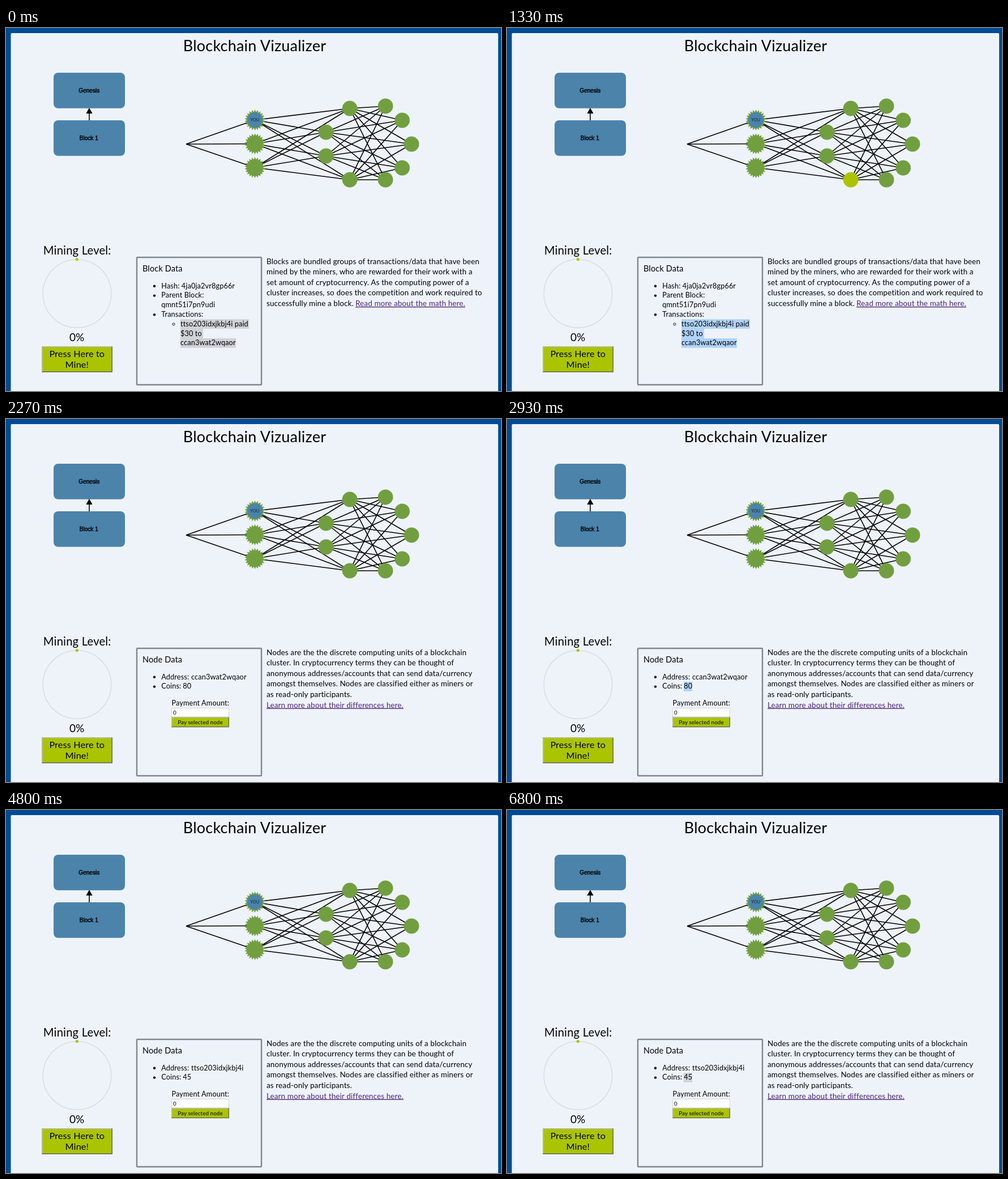
Recreate the animation shown at these times as an HTML page. Size 874x641 px, loop 6.87 s.

```html
<!DOCTYPE html>
<html lang="en">
<head>
<meta charset="utf-8">
<title>Blockchain Vizualizer</title>
<style>
  html, body { margin: 0; width: 100%; height: 100%; overflow: hidden; background: #004b93; }
  svg { display: block; width: 874px; height: 641px; }
  text { font: 12.7px Lato, "Open Sans", sans-serif; letter-spacing: .01em; white-space: pre; }
  .mid { text-anchor: middle; }
  text.title { font-size: 26.88px; }
  text.level { font-size: 20.2px; }
  text.percent { font-size: 19px; }
  text.press { font-size: 16.2px; }
  text.head { font-size: 14.5px; }
  text.body { font-size: 13.44px; }
  text.link { fill: #4f2477; text-decoration: underline; }
  text.small { font-size: 9.8px; }
  text.you { font-size: 7.4px; fill: #17232c; }
  text.block { font: 10.08px "Liberation Sans", Arial, sans-serif; letter-spacing: 0; stroke: #000; stroke-width: .45px; }
  .wire { stroke: #000; stroke-width: 1.6; }
  .node { fill: #719f3f; }
  .blue { fill: #4b83ab; }
  .lime { fill: #abc400; }
  .ring { fill: none; stroke: #dadddf; stroke-width: 1.5; }
</style>
</head>
<body>
<svg viewBox="0 0 874 641">
  <rect x="8.5" y="9" width="860.5" height="640" rx="2" fill="#eef3fa"/>
  <text class="title mid" x="439" y="40.5">Blockchain Vizualizer</text>

  <rect class="blue" x="84" y="79" width="126" height="62.8" rx="8"/>
  <rect class="blue" x="84" y="163" width="126" height="62.8" rx="8"/>
  <text class="block mid" x="146.8" y="114.4">Genesis</text>
  <text class="block mid" x="146.3" y="198.4">Block 1</text>
  <path class="wire" d="M147 163V150"/>
  <path d="M147 141l5.6 10h-11.2z"/>

  <g id="net"></g>
  <text class="you mid" x="439.3" y="165.2">YOU</text>

  <text class="level mid" x="125.7" y="399.8">Mining Level:</text>
  <circle class="ring" cx="125.5" cy="469" r="60.3"/>
  <circle class="lime" cx="125.3" cy="408.6" r="2.6"/>
  <text class="percent mid" x="125.2" y="553">0%</text>
  <rect class="lime" x="63" y="562" width="125" height="46"/>
  <path d="M64 608V563H188" fill="none" stroke="#b9bba9" stroke-width="1.7"/>
  <path d="M187.2 562.5V607.2H63.5" fill="none" stroke="#70745c" stroke-width="1.7"/>
  <text class="press mid" x="125.3" y="581.4">Press Here to</text>
  <text class="press mid" x="125.3" y="600.3">Mine!</text>

  <rect x="231" y="405" width="220" height="225" rx="1" fill="none" stroke="#828589" stroke-width="2.4"/>

  <g id="blockPanel">
    <path id="paySel" d="M308 514.3h121v16.8h-81v16.8h58v16.8h-98z"/>
  </g>
  <g id="nodePanel">
    <rect id="coinSel" x="312" y="464" width="15" height="16.8"/>
    <text x="292.5" y="505.8">Payment Amount:</text>
    <rect x="292.5" y="510.5" width="101" height="15.5" fill="#fff" stroke="#d3d5d8"/>
    <text class="small" x="295" y="522">0</text>
    <rect class="lime" x="292" y="526.3" width="102" height="18"/>
    <path d="M292.8 544V527H394" fill="none" stroke="#b9bba9" stroke-width="1.5"/>
    <path d="M393.3 526.5V543.6H292.3" fill="none" stroke="#70745c" stroke-width="1.5"/>
    <text class="small mid" x="343" y="538.6">Pay selected node</text>
  </g>
</svg>
<script>
const LOOP = 6870, BLUE = '#b0d2f8', GREY = '#cfd2d7';
const $ = id => document.getElementById(id);
const net = $('net'), blockPanel = $('blockPanel'), nodePanel = $('nodePanel');

function add(parent, tag, attrs, content = '') {
  const el = document.createElementNS('http://www.w3.org/2000/svg', tag);
  for (const key in attrs) el.setAttribute(key, attrs[key]);
  el.textContent = content;
  return parent.appendChild(el);
}
const write = (parent, x, y, content, cls = '') =>
  add(parent, 'text', { x, y, class: cls }, content);
const row = i => 459.6 + 16.8 * i;
const line = i => 416.8 + 18.55 * i;
const dot = (parent, i) => add(parent, 'circle', { cx: 262, cy: row(i) - 3.8, r: 2.2 });

// Network
const root = [318, 205];
const miners = [162.5, 204.5, 246.5].map(y => [439.5, y]);
const middle = [[607, 142], [565, 184], [565, 226], [607, 268]];
const outer = [[670, 138], [699.5, 163], [716, 205], [699.5, 247], [670, 268]];

function connect(from, to) {
  for (const a of from) for (const b of to)
    add(net, 'path', { class: 'wire', d: `M${a}L${b}` });
}
function star([x, y], spikes = 22) {
  const points = Array.from({ length: spikes * 2 }, (_, i) => {
    const angle = i * Math.PI / spikes - Math.PI / 2, r = i % 2 ? 14.3 : 18.4;
    return [x + r * Math.cos(angle), y + r * Math.sin(angle)];
  });
  add(net, 'polygon', { class: 'node', points: points.join(' ') });
}
const disc = ([cx, cy], cls = 'node') => add(net, 'circle', { cx, cy, r: 13.4, class: cls });

connect([root], miners);
connect(miners, middle);
connect(middle, outer);
miners.forEach(p => star(p));
disc(miners[0], 'blue');
const discs = [...middle, ...outer].map(p => disc(p));
const hovered = discs[3];

// Block details
write(blockPanel, 241, 430, 'Block Data', 'head');
[0, 1, 3].forEach(i => dot(blockPanel, i));
['Hash: 4ja0ja2vr8gp66r', 'Parent Block:', 'qmnt51i7pn9udi', 'Transactions:']
  .forEach((s, i) => write(blockPanel, 274.3, row(i), s));
add(blockPanel, 'circle', { cx: 296, cy: row(4) - 3.8, r: 2.1, fill: 'none', stroke: '#000', 'stroke-width': .9 });
['ttso203idxjkbj4i paid', '$30 to', 'ccan3wat2wqaor']
  .forEach((s, i) => write(blockPanel, 308, row(i + 4), s));
[
  'Blocks are bundled groups of transactions/data that have been',
  'mined by the miners, who are rewarded for their work with a',
  'set amount of cryptocurrency. As the computing power of a',
  'cluster increases, so does the competition and work required to',
  'successfully mine a block.'
].forEach((s, i) => write(blockPanel, 460, line(i), s, 'body'));
write(blockPanel, 617, line(4), 'Read more about the math here.', 'body link');

// Node details
write(nodePanel, 241, 430, 'Node Data', 'head');
[0, 1].forEach(i => dot(nodePanel, i));
write(nodePanel, 274.3, row(0), 'Address:');
write(nodePanel, 274.3, row(1), 'Coins:');
const address = write(nodePanel, 327, row(0));
const coins = write(nodePanel, 312.3, row(1));
[
  'Nodes are the the discrete computing units of a blockchain',
  'cluster. In cryptocurrency terms they can be thought of',
  'anonymous addresses/accounts that can send data/currency',
  'amongst themselves. Nodes are classified either as miners or',
  'as read-only participants.'
].forEach((s, i) => write(nodePanel, 460, line(i), s, 'body'));
write(nodePanel, 460, line(5), 'Learn more about their differences here.', 'body link');

function draw(now) {
  const t = now % LOOP;
  const within = (from, to) => t >= from && t < to;
  const onBlock = t < 1530, payer = t >= 3600;

  blockPanel.style.display = onBlock ? '' : 'none';
  nodePanel.style.display = onBlock ? 'none' : '';
  $('paySel').style.fill = t < 600 ? GREY : BLUE;
  hovered.setAttribute('class', within(1130, 1600) ? 'lime' : 'node');

  address.textContent = payer ? 'ttso203idxjkbj4i' : 'ccan3wat2wqaor';
  coins.textContent = payer ? '45' : '80';
  $('coinSel').style.fill = t >= 6670 ? GREY
    : within(2400, 3600) || t >= 6000 ? BLUE : 'none';
}
const start = performance.now();
function tick() {
  draw(performance.now() - start);
  requestAnimationFrame(tick);
}
tick();
</script>
</body>
</html>
```
